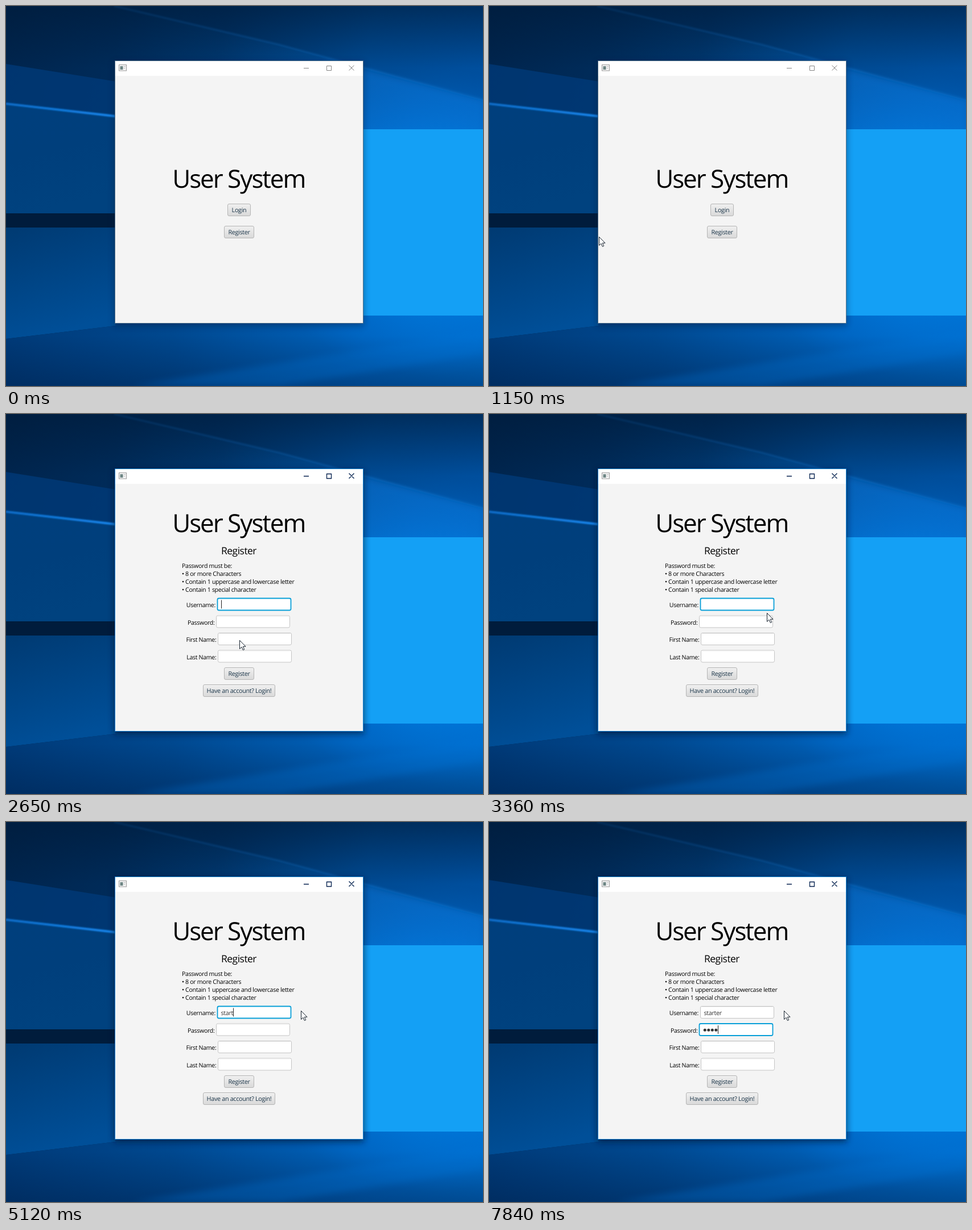
An HTML page for the animation above (8 s loop, 838 by 669 pixels).

```html
<!DOCTYPE html>
<html lang="en">
<head>
<meta charset="utf-8">
<title>User System</title>
<style>
html, body { margin: 0; width: 100%; height: 100%; overflow: hidden; background: #003068; }
svg { display: block; width: 100vw; height: 100vh; }
text { font-family: "Open Sans", "Noto Sans", sans-serif; font-size: 10.6px; letter-spacing: -0.03em; fill: #000; text-rendering: geometricPrecision; }
.big { font-size: 44px; letter-spacing: -0.046em; }
.mid { font-size: 17.5px; }
.btn text { font-size: 10.8px; fill: #1a3448; }
.typed { font-size: 10.8px; fill: #333; }
</style>
</head>
<body>
<svg viewBox="0 0 838 669" preserveAspectRatio="none">
  <defs>
    <linearGradient id="sky" x2="1" y2=".2">
      <stop offset="0" stop-color="#00244c"/><stop offset=".45" stop-color="#003164"/>
      <stop offset=".75" stop-color="#004a92"/><stop offset="1" stop-color="#004f9e"/>
    </linearGradient>
    <linearGradient id="dusk" x2="0" y2="1">
      <stop offset="0" stop-color="#001a38" stop-opacity=".6"/><stop offset="1" stop-color="#001a38" stop-opacity="0"/>
    </linearGradient>
    <linearGradient id="wall" x2=".25" y2="1">
      <stop offset="0" stop-color="#003f7d"/><stop offset=".5" stop-color="#003f7c"/><stop offset="1" stop-color="#00427f"/>
    </linearGradient>
    <linearGradient id="low" x2=".3" y2="1">
      <stop offset="0" stop-color="#003a72"/><stop offset="1" stop-color="#004f98"/>
    </linearGradient>
    <linearGradient id="floor" x2="1">
      <stop offset="0" stop-color="#003a78"/><stop offset=".35" stop-color="#00488f"/>
      <stop offset=".75" stop-color="#0062bc"/><stop offset="1" stop-color="#006cca"/>
    </linearGradient>
    <linearGradient id="shade" x2="0" y2="1">
      <stop offset="0" stop-color="#001a40" stop-opacity="0"/><stop offset="1" stop-color="#001a40" stop-opacity=".4"/>
    </linearGradient>
    <linearGradient id="beam" x2="1">
      <stop offset="0" stop-color="#0070d0" stop-opacity="0"/><stop offset="1" stop-color="#0878dc" stop-opacity=".75"/>
    </linearGradient>
    <linearGradient id="streak" x2="1">
      <stop offset="0" stop-color="#0a6cc8"/><stop offset="1" stop-color="#1787ee"/>
    </linearGradient>
    <radialGradient id="glow">
      <stop offset="0" stop-color="#0a9bff" stop-opacity=".9"/><stop offset=".55" stop-color="#0080e8" stop-opacity=".55"/>
      <stop offset="1" stop-color="#0070d8" stop-opacity="0"/>
    </radialGradient>
    <linearGradient id="face" x2="0" y2="1"><stop offset="0" stop-color="#f0f0f0"/><stop offset="1" stop-color="#d9d9d9"/></linearGradient>
    <linearGradient id="faceHover" x2="0" y2="1"><stop offset="0" stop-color="#fafafa"/><stop offset="1" stop-color="#e6e6e6"/></linearGradient>
    <linearGradient id="facePress" x2="0" y2="1"><stop offset="0" stop-color="#d2d2d2"/><stop offset="1" stop-color="#dedede"/></linearGradient>
    <filter id="soft" x="-20%" y="-20%" width="140%" height="140%"><feGaussianBlur stdDeviation="6"/></filter>
    <filter id="thin" x="-20%" y="-100%" width="140%" height="300%"><feGaussianBlur stdDeviation="1.2"/></filter>
  </defs>

  <g id="wallpaper">
    <rect width="838" height="669" fill="url(#sky)"/>
    <path d="M190 0L480 68L838 165V260H560L190 98Z" fill="url(#beam)" opacity=".45"/>
    <path d="M560 95L838 168V240H560Z" fill="#0878dc" opacity=".4" filter="url(#soft)"/>
    <path d="M0 102L200 134V194L0 172Z" fill="#003a78" opacity=".8"/>
    <path d="M0 172L192 194V365H0Z" fill="url(#wall)"/>
    <path d="M0 390H192V563L0 586Z" fill="url(#low)"/>
    <path d="M0 365H192V390H0Z" fill="#001c3c"/>
    <path d="M0 586L192 563V540H838V669H0Z" fill="url(#floor)"/>
    <path d="M0 580H838V669H0Z" fill="url(#shade)"/>
    <path d="M220 669L838 572V612L480 669Z" fill="#0072d4" opacity=".3" filter="url(#soft)"/>
    <path d="M0 172L192 194" stroke="url(#streak)" stroke-width="4" filter="url(#thin)"/>
    <path d="M190 0L480 68L838 165" fill="none" stroke="#0a66b8" stroke-width="4" opacity=".4" filter="url(#thin)"/>
    <rect width="838" height="110" fill="url(#dusk)"/>
    <ellipse cx="750" cy="380" rx="320" ry="270" fill="url(#glow)"/>
    <rect x="622" y="217" width="328" height="328" fill="#14a0f5"/>
  </g>

  <rect id="shadow" x="190" y="99" width="439" height="464" fill="#001830" filter="url(#soft)"/>
  <rect x="192" y="97" width="435" height="461" fill="#f4f4f4"/>
  <rect x="192" y="97" width="435" height="26" fill="#fff"/>
  <rect id="frame" x="191.5" y="96.5" width="436" height="462" fill="none"/>
  <g fill="none" stroke="#9a9a9a">
    <rect x="198.5" y="103.5" width="13" height="10.5" fill="#f3f3f3"/>
    <rect x="200.5" y="106" width="5" height="6" fill="#6d8583" stroke="none"/>
    <path d="M207 106.5H210M207 109.5H209" stroke="#bbb"/>
  </g>
  <path id="controls" d="M523 109.5H532M563.5 105.5H571.5V113.5H563.5ZM602.5 104.5L611.5 113.5M611.5 104.5L602.5 113.5" fill="none"/>

  <g id="home"><text class="big" x="408.8" y="320" text-anchor="middle">User System</text></g>
  <g id="form">
    <text class="big" x="408.8" y="208" text-anchor="middle">User System</text>
    <text class="mid" x="409" y="246.5" text-anchor="middle">Register</text>
  </g>
  <text id="user" class="typed" x="377.5" y="339.5"></text>
  <g id="dots" fill="#333"></g>
  <path id="caret" stroke="#222" fill="none"/>
  <path id="cursor" d="M.5 .5V15.5L4 12.2L6.4 17.6L8.7 16.6L6.4 11.3H11Z" fill="#fff" stroke="#14202c" stroke-linejoin="round"/>
</svg>
<script>
const LOOP = 8000, NAME = 'starter';
const $ = id => document.getElementById(id);

function set(el, attrs) {
  for (const key in attrs) el.setAttribute(key, attrs[key]);
}
function add(parent, tag, attrs, text) {
  const el = document.createElementNS('http://www.w3.org/2000/svg', tag);
  set(el, attrs);
  if (text) el.textContent = text;
  return parent.appendChild(el);
}
const show = (el, on) => set(el, { visibility: on ? 'visible' : 'hidden' });

function button(parent, label, x, y, w) {
  const g = add(parent, 'g', { class: 'btn' });
  const face = add(g, 'rect', { x: x + .5, y: y + .5, width: w - 1, height: 21, rx: 2.5, fill: 'url(#face)', stroke: '#b5b5b5' });
  add(g, 'text', { x: x + w / 2, y: y + 15.3, 'text-anchor': 'middle' }, label);
  return face;
}

// Returns the focus ring drawn over the box
function field(label, labelEnd, x, y) {
  const form = $('form');
  const box = { x: x + .5, y: y + .5, width: 129, height: 21, rx: 2.5, fill: '#fff' };
  add(form, 'text', { x: labelEnd, y: y + 16, 'text-anchor': 'end' }, label);
  add(form, 'rect', { ...box, stroke: '#c4c4c4' });
  add(form, 'path', { d: `M${x + 3} ${y + 1.5}h124`, stroke: '#ececec' });
  return add(form, 'rect', { ...box, stroke: '#089fd8', 'stroke-width': 1.8, visibility: 'hidden' });
}

button($('home'), 'Login', 389, 348, 41);
const registerFace = button($('home'), 'Register', 383, 387, 53);

['Password must be:', '• 8 or more Characters', '• Contain 1 uppercase and lowercase letter', '• Contain 1 special character']
  .forEach((line, i) => add($('form'), 'text', { x: 309, y: 271 + 14 * i }, line));
const userRing = field('Username:', 368, 371, 324);
const passRing = field('Password:', 366.5, 369, 354.5);
field('First Name:', 369.5, 372, 385);
field('Last Name:', 369.5, 372, 415.5);
button($('form'), 'Register', 383, 446, 53);
button($('form'), 'Have an account? Login!', 346, 476, 127);

const dots = [0, 1, 2, 3].map(i => add($('dots'), 'circle', { cx: 379.3 + 6.5 * i, cy: 366.3, r: 2.5 }));

// Pointer stops: time, x, y
const path = [
  [160, 709, 647], [960, 402, 391], [1150, 192.5, 406], [1790, 192.5, 406],
  [2320, 409.5, 398], [2880, 409.5, 398], [3610, 517.5, 332], [LOOP, 517.5, 332]
];
const ease = p => p * p * (3 - 2 * p);

function pointer(t) {
  const i = Math.max(1, path.findIndex(stop => stop[0] > t));
  const [t0, x0, y0] = path[i - 1], [t1, x1, y1] = path[i];
  const p = ease(Math.max(0, (t - t0) / (t1 - t0)));
  return [x0 + (x1 - x0) * p, y0 + (y1 - y0) * p];
}

const bulletTimes = [7040, 7300, 7560, 7840];
const caretOff = [[3130, 3610], [4100, 4610], [6080, 6570]];

function render(t) {
  const active = t >= 2450, onForm = t >= 2650, inPass = t >= 5580;
  set($('frame'), { stroke: active ? '#1680d0' : '#56728c' });
  set($('controls'), { stroke: active ? '#001f4d' : '#858585', 'stroke-width': active ? 1.3 : 1 });
  set($('shadow'), { opacity: active ? .65 : .4 });
  $('home').style.display = onForm ? 'none' : '';
  $('form').style.display = onForm ? '' : 'none';
  show(userRing, !inPass);
  show(passRing, inPass);

  const [x, y] = pointer(t);
  show($('cursor'), t >= 160);
  set($('cursor'), { transform: `translate(${Math.round(x)} ${Math.round(y)})` });
  const hover = t >= 160 && x >= 383 && x <= 436 && y >= 387 && y <= 409;
  const face = hover ? (active ? 'facePress' : 'faceHover') : 'face';
  set(registerFace, { fill: `url(#${face})` });

  const typed = t < 4760 ? 0 : Math.min(NAME.length, 1 + Math.floor((t - 4760) / 90));
  $('user').textContent = NAME.slice(0, typed);
  const bullets = bulletTimes.filter(k => t >= k).length;
  dots.forEach((dot, i) => show(dot, i < bullets));

  show($('caret'), onForm && !caretOff.some(([from, to]) => t >= from && t < to));
  const cx = inPass ? 376 + 6.5 * bullets : 378 + (typed ? $('user').getComputedTextLength() : 0);
  set($('caret'), { d: `M${Math.floor(cx) + .5} ${inPass ? 358 : 327.5}v15` });
}

const start = performance.now();
function tick() {
  render((performance.now() - start) % LOOP);
  requestAnimationFrame(tick);
}
tick();
</script>
</body>
</html>
```
